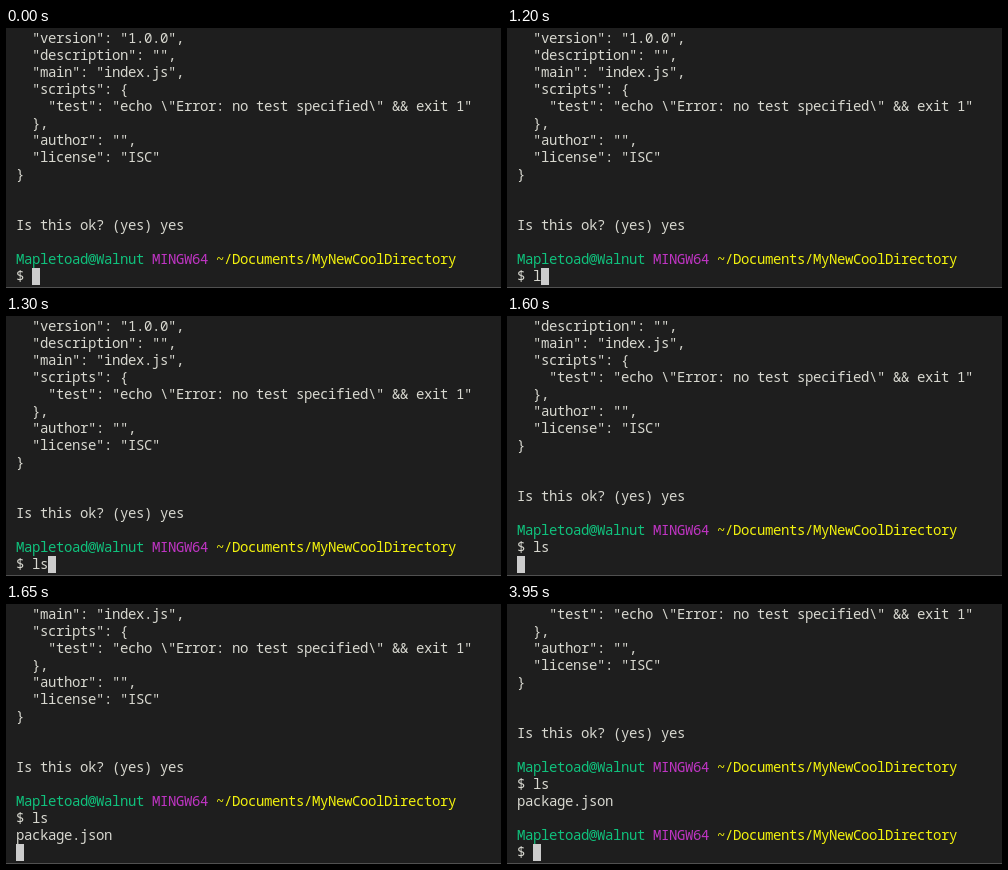
Recreate the animation shown at these times as an HTML page. Size 495 by 260 pixels, loop 5.45 s.

```html
<!DOCTYPE html>
<html lang="en">
<head>
<meta charset="utf-8">
<title>Terminal</title>
<style>
  html, body { margin: 0; width: 100%; height: 100%; overflow: hidden; background: #1e1e1e; }
  svg { display: block; width: 495px; height: 260px; }
  text {
    font: 500 14px "Noto Sans Mono", "DejaVu Sans Mono", monospace;
    letter-spacing: -0.4px;
    white-space: pre;
    fill: #d8d8d0;
  }
  .user { fill: #10c27d; }
  .shell { fill: #c035c4; }
  .path { fill: #f2f20e; }
</style>
</head>
<body>
<svg viewBox="0 0 495 260">
  <rect width="495" height="260" fill="#1e1e1e"/>
  <rect y="259" width="495" height="1" fill="#505050"/>
  <g id="screen"></g>
  <rect id="cursor" width="8" height="17" fill="#cccccc"/>
</svg>
<script>
const LOOP = 5450, ROWS = 15, LEFT = 10, TOP = 2, CELL = 8, LINE = 17, BASE = 13;
const NS = "http://www.w3.org/2000/svg";
const screen = document.getElementById("screen");
const cursor = document.getElementById("cursor");

// A line is a string or a list of [class, text] parts.
const prompt = [["user", "Mapletoad@Walnut"], ["", " "], ["shell", "MINGW64"], ["", " "], ["path", "~/Documents/MyNewCoolDirectory"]];
const history = [
  '  "version": "1.0.0",',
  '  "description": "",',
  '  "main": "index.js",',
  '  "scripts": {',
  '    "test": "echo \\"Error: no test specified\\" && exit 1"',
  '  },',
  '  "author": "",',
  '  "license": "ISC"',
  '}',
  '',
  '',
  'Is this ok? (yes) yes',
  '',
  prompt
];

// Lines below the history, each set valid from its start time.
const steps = [
  [0, ["$ "]],
  [1200, ["$ l"]],
  [1300, ["$ ls"]],
  [1600, ["$ ls", ""]],
  [1650, ["$ ls", "package.json", ""]],
  [1700, ["$ ls", "package.json", "", prompt, "$ "]]
];

function textLine(line, row) {
  const text = document.createElementNS(NS, "text");
  text.setAttribute("x", LEFT);
  text.setAttribute("y", TOP + row * LINE + BASE);
  if (typeof line === "string") {
    text.textContent = line;
  } else {
    for (const [name, part] of line) {
      const span = document.createElementNS(NS, "tspan");
      if (name) span.setAttribute("class", name);
      span.textContent = part;
      text.append(span);
    }
  }
  return text;
}

let shown = null;

function draw(time) {
  const step = steps.filter(([start]) => start <= time).pop();
  if (step === shown) return;
  shown = step;
  const lines = history.concat(step[1]).slice(-ROWS);
  screen.replaceChildren(...lines.map(textLine));
  cursor.setAttribute("x", LEFT + lines[ROWS - 1].length * CELL);
  cursor.setAttribute("y", TOP + (ROWS - 1) * LINE);
}

const begin = performance.now();
function tick() {
  draw((performance.now() - begin) % LOOP);
  requestAnimationFrame(tick);
}
tick();
</script>
</body>
</html>
```
